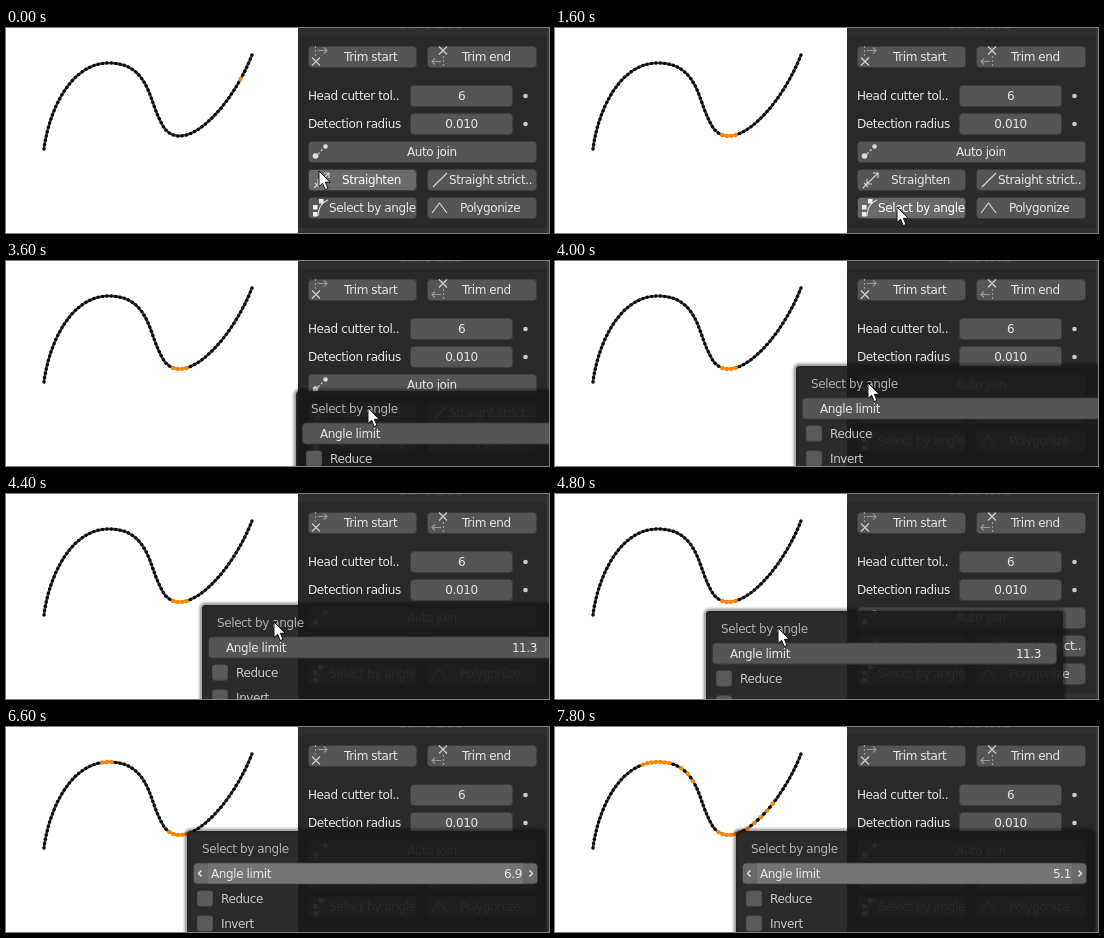
Recreate the animation shown at these times as an HTML page. Size 543 by 205 pixels, loop 8 s.

```html
<!DOCTYPE html>
<html lang="en">
<head>
<meta charset="utf-8">
<title>Curve tools panel</title>
<style>
html, body { margin: 0; width: 100%; height: 100%; overflow: hidden; background: #fff; }
svg { display: block; width: 543px; height: 205px; }
text { font: 12px "DejaVu Sans", sans-serif; letter-spacing: -.4px; fill: #e6e6e6; white-space: pre; }
.icon { fill: none; stroke: #d0d0d0; stroke-width: 1.2; }
.dim { opacity: .55; }
.btn rect { fill: #555; stroke: #3c3c3c; }
.btn.on rect { fill: #6a6a6a; }
.btn.on text { fill: #fff; }
.btn rect.dot { fill: #eee; stroke: none; }
</style>
</head>
<body>
<svg viewBox="0 0 543 205">
  <defs>
    <filter id="blur" x="-5%" y="-10%" width="110%" height="120%"><feGaussianBlur stdDeviation="1.5"/></filter>
  </defs>
  <rect width="543" height="205" fill="#fff"/>
  <path id="curve" fill="none" d="M38,121 C42,88 62,35 103,35 C140,35 143,68 152,88 C157,99 161,108 174,108 C196,107.5 228,72 246,27"/>
  <g id="mesh"></g>
  <g id="panel">
    <rect x="292" width="251" height="205" fill="#292929"/>
    <rect x="292" width="251" height="8" fill="#2e2e2e"/>
    <rect x="292" y="200" width="251" height="5" fill="#303030"/>
    <rect x="541" width="2" height="205" fill="#383838"/>
  </g>
  <g id="popup"></g>
  <path id="cursor" fill="#fff" stroke="#111" stroke-linejoin="round"
    d="M0,0 V15.5 L3.6,12.3 L6.3,18.6 L9,17.4 L6.4,11.3 H11.2 Z"/>
</svg>
<script>
const $ = id => document.getElementById(id);
const STEP = 200, LOOP = 8000;
const SELECT = 1600, OPEN = 3400, DROP = 5200, GRAB = 5800;

function add(parent, tag, attrs, label) {
  const el = document.createElementNS('http://www.w3.org/2000/svg', tag);
  for (const k in attrs) el.setAttribute(k, attrs[k]);
  if (label) el.textContent = label;
  return parent.appendChild(el);
}
const text = (parent, x, y, label, attrs) => add(parent, 'text', { x, y: y + 4.3, ...attrs }, label);
const box = (parent, x, y, width, height, attrs) => add(parent, 'rect', { x, y, width, height, rx: 3.5, ...attrs });

// Curve as a chain of vertices and edges
const curve = $('curve'), total = curve.getTotalLength(), COUNT = 78;
const points = Array.from({ length: COUNT }, (_, i) => curve.getPointAtLength(total * i / (COUNT - 1)));
const edges = points.slice(1).map((p, i) =>
  add($('mesh'), 'line', { x1: points[i].x, y1: points[i].y, x2: p.x, y2: p.y, 'stroke-width': 2.6 }));
const verts = points.map(p => add($('mesh'), 'circle', { cx: p.x, cy: p.y }));
const picked = points.findIndex(p => p.x >= 234);

// Bends: centre x, sharpness there, falloff per pixel, every n-th vertex
const bends = [[174, 21.8, 1.24, 1], [102, 8.5, .21, 1], [132, 6.5, .14, 2], [204, 6.5, .08, 2], [70, 5, .05, 3]];
const sharpness = points.map((p, i) => Math.max(...bends.map(([x, peak, falloff, nth]) =>
  i % nth ? 0 : peak - falloff * Math.abs(p.x - x))));

function select(test) {
  const on = points.map((_, i) => test(i));
  verts.forEach((v, i) => {
    v.setAttribute('fill', on[i] ? '#ff8500' : '#080808');
    v.setAttribute('r', on[i] ? 2.2 : 1.75);
  });
  edges.forEach((e, i) => e.setAttribute('stroke', on[i] && on[i + 1] ? '#f08a20' : '#444'));
}

// Side panel
const panel = $('panel');
const buttons = [];
function button(x, y, w, label, tx, icon, faint) {
  const g = add(panel, 'g', { class: 'btn' });
  box(g, x + .5, y - 10.5, w - 1, 21);
  if (faint) add(g, 'path', { class: 'icon dim', d: faint });
  add(g, 'path', { class: 'icon', d: icon });
  text(g, tx, y, label);
  buttons.push({ g, x, y, w });
  return g;
}
function field(y, label, value) {
  text(panel, 302, y, label);
  box(panel, 404.5, y - 10.5, 102, 21, { fill: '#555', stroke: '#3c3c3c' });
  text(panel, 455.5, y, value, { 'text-anchor': 'middle' });
  add(panel, 'circle', { cx: 519.5, cy: y, r: 2.3, fill: '#c8c8c8' });
}
text(panel, 392, -3, 'Curve tools', { style: 'fill:#484848' });
button(302, 29, 109, 'Trim start', 338, 'M306,29.5l8,8m0,-8l-8,8',
  'M309.5,18v2m0,2v2m0,2v2M312,22.5h9m-3,-3l3,3l-3,3');
button(421, 29, 110, 'Trim end', 456, 'M433,18.5l8,8m0,-8l-8,8',
  'M437.5,28v2m0,2v2m0,2v2M435,33.5h-9m3,-3l-3,3l3,3');
field(68, 'Head cutter tol..', '6');
field(96, 'Detection radius', '0.010');
const join = button(302, 124, 229, 'Auto join', 401, 'M312,126l1.5,-1.5m1.5,-1.5l1.5,-1.5');
add(join, 'circle', { cx: 309.5, cy: 128, r: 2.8, fill: '#ddd' });
add(join, 'circle', { cx: 319.5, cy: 118.5, r: 2.3, fill: '#ddd' });
button(302, 152, 109, 'Straighten', 336, 'M308,160L323,145m-5,0h5v5M312,151v5h5M309,155l4,4');
button(421, 152, 110, 'Straight strict..', 443, 'M427,159L441,145');
const angle = button(302, 180, 109, 'Select by angle', 323, 'M312,188C313,179 315,175 322,172');
for (const [x, y] of [[307, 177], [307, 184], [313, 171]])
  add(angle, 'rect', { class: 'dot', x, y, width: 4.5, height: 4.5 });
button(421, 180, 110, 'Polygonize', 454, 'M426,185L433.5,175L441,185');

// Floating operator dialog
const popup = $('popup');
box(popup, -.5, -.5, 358, 151, { fill: 'none', stroke: '#000', 'stroke-width': 3, opacity: .5, filter: 'url(#blur)' });
box(popup, 0, 0, 357, 150, { fill: '#1a1a1a', 'fill-opacity': .92 });
text(popup, 15, 17.5, 'Select by angle', { style: 'fill:#b0b0b0' });
const slider = box(popup, 6.5, 32, 344, 21, { stroke: '#3a3a3a' });
const arrows = add(popup, 'g', {});
box(arrows, 21, 32.5, 315, 20, { rx: 0, fill: '#747474' });
add(arrows, 'path', { d: 'M14.5,39.5l-3,3l3,3M342.5,39.5l3,3l-3,3', fill: 'none', stroke: '#eee', 'stroke-width': 1.3 });
text(popup, 24, 42.5, 'Angle limit');
const value = text(popup, 335, 42.5, '', { 'text-anchor': 'end' });
['Reduce', 'Invert'].forEach((label, i) => {
  box(popup, 10.5, 60 + 25 * i, 15, 15, { rx: 2, fill: '#5a5a5a', stroke: '#505050' });
  text(popup, 34, 67.5 + 25 * i, label, { style: 'fill:#c8c8c8' });
});

// Pointer key points: [time, x, y]
const path = [
  [0, 313, 143], [400, 289, 162], [1200, 342, 179], [2200, 342, 179], [2800, 327, 147], [3000, 327, 147],
  [OPEN, 387, 160], [4000, 313, 122], [4800, 223, 134], [DROP, 253, 121], [5600, 400, 125], [LOOP, 400, 125]
];
function pointer(t) {
  const i = path.findIndex(k => k[0] > t);
  const [t0, x0, y0] = path[i - 1], [t1, x1, y1] = path[i];
  const u = (t - t0) / (t1 - t0);
  return [x0 + (x1 - x0) * u, y0 + (y1 - y0) * u].map(Math.round);
}

// The slider is pulled down to 4.5, slowing, then pushed back a little
function angleLimit(t) {
  const left = Math.min(1, Math.max(0, (7400 - t) / (7400 - GRAB)));
  return 4.5 + 6.8 * left ** 1.5 + .0015 * Math.max(0, t - 7400);
}

function draw(t) {
  const [x, y] = pointer(t);
  const open = t >= OPEN, grab = t >= GRAB;
  const limit = angleLimit(t);

  select(i => t < SELECT ? i === picked : sharpness[i] >= limit);
  for (const b of buttons)
    b.g.classList.toggle('on', !open && x >= b.x && x < b.x + b.w && Math.abs(y - b.y) <= 11);

  const [px, py] = pointer(Math.min(t, DROP));
  popup.setAttribute('transform', `translate(${px - 72},${py - 17})`);
  popup.style.display = open ? '' : 'none';
  slider.setAttribute('fill', grab ? '#686868' : '#555');
  arrows.style.display = grab ? '' : 'none';
  value.textContent = limit.toFixed(1);

  $('cursor').setAttribute('transform', `translate(${x},${y})`);
  $('cursor').style.display = grab ? 'none' : '';
}

let shown = -1;
const start = performance.now();
function tick() {
  const t = Math.floor((performance.now() - start) % LOOP / STEP) * STEP;
  if (t !== shown) draw(shown = t);
  requestAnimationFrame(tick);
}
tick();
</script>
</body>
</html>
```
